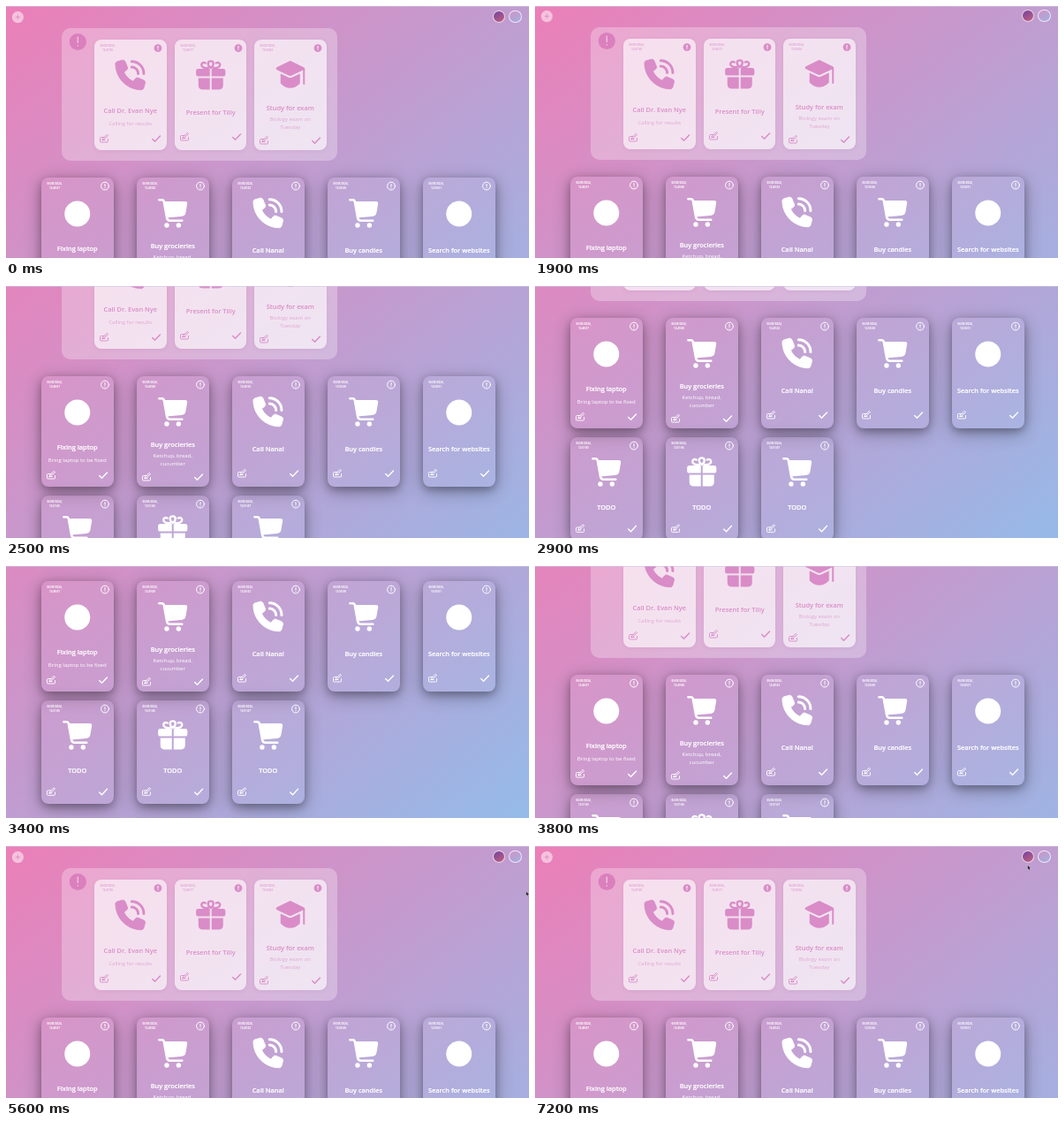
An HTML page for the animation above (7300 ms loop, 592x285 px).

```html
<!DOCTYPE html>
<html lang="en">
<head>
<meta charset="utf-8">
<title>Todo board</title>
<style>
  html, body { margin: 0; width: 100%; height: 100%; overflow: hidden; }
  #stage { position: relative; width: 592px; height: 285px; overflow: hidden; }
  #stage::after { content: ""; position: absolute; inset: 0 0 auto; height: 1px; background: rgba(205, 200, 232, .6); }
  #page { position: absolute; width: 592px; height: 463px; background: linear-gradient(to bottom right, #ec7fb8, #94bbe9); }
  #page > * { position: absolute; box-sizing: border-box; }
  .panel { left: 62.5px; top: 25px; width: 312.5px; height: 150px; border-radius: 10px; background: rgba(255, 255, 255, .28); }
  .card { width: 81.5px; border-radius: 8px; color: #fff; background: rgba(255, 255, 255, .05); box-shadow: 0 3px 8px rgba(0, 0, 0, .24), 0 5px 20px rgba(0, 0, 0, .32); }
  .urgent { color: #d98cc7; background: rgba(255, 255, 255, .63); box-shadow: 0 1px 4px rgba(160, 80, 150, .12); }
  .theme { top: 4.8px; width: 14.5px; height: 14.5px; border-radius: 50%; border: 1px solid rgba(255, 255, 255, .75); }
  svg { display: block; overflow: visible; }
  .card svg { fill: currentColor; font-family: "Open Sans", "Noto Sans", sans-serif; text-anchor: middle; }
  .line { fill: none; stroke: currentColor; stroke-linecap: round; stroke-linejoin: round; }
  .date { font-size: 3px; font-weight: 700; }
  .title { font-size: 7.4px; font-weight: 600; stroke: currentColor; stroke-width: .2px; }
  .note { font-size: 6.05px; }
  .urgent .title { stroke: none; }
  .urgent .note, .urgent .date { opacity: .7; }
  #cursor { position: absolute; left: 0; top: 0; }
</style>
</head>
<body>
<div id="stage">
  <div id="page">
    <div class="panel"></div>
    <svg width="592" height="60">
      <circle cx="13.4" cy="12.6" r="6.6" fill="#fff" fill-opacity=".52"/>
      <path d="M10.9 12.6h5M13.4 10.1v5" stroke="#dd93c6"/>
      <circle cx="81.3" cy="40.5" r="9.6" fill="#db7fbd"/>
      <path d="M81.3 35.2v6.4M81.3 44.7v.4" stroke="#f0bfde" stroke-width="1.5" stroke-linecap="round"/>
    </svg>
    <div class="theme" style="left:550.7px;background:linear-gradient(150deg,#73409f,#c4627f)"></div>
    <div class="theme" style="left:569px;background:linear-gradient(150deg,#d093c6,#a0b2e2)"></div>
  </div>
  <svg id="cursor" width="6" height="8"><path d="M0 0v5.6l1.4-1.2 1 2 .9-.4-.9-2h1.7z" fill="#2b2030" stroke="#fff" stroke-width=".35"/></svg>
</div>
<script>
const LOOP = 7300, STEP = 100;
const page = document.getElementById('page');
const cursor = document.getElementById('cursor');

// Icons are centred on 0,0 and about 33px wide.
const icons = {
  dot: '<circle cy="1" r="14.5"/>',
  phone: `<g transform="scale(.0655) translate(-256 -256)">
    <path stroke="currentColor" stroke-width="14" stroke-linejoin="round" d="M164.9 24.6c-7.7-18.6-28-28.5-47.4-23.2l-88 24C12.1 30.2 0 46 0 64c0 247.4 200.6 448 448 448 18 0 33.8-12.1 38.6-29.5l24-88c5.3-19.4-4.6-39.7-23.2-47.4l-96-40c-16.3-6.8-35.2-2.1-46.3 11.6L304.7 368C234.3 334.7 177.3 277.7 144 207.3L193.3 167c13.7-11.2 18.4-30 11.6-46.3z"/>
    <path class="line" stroke-width="46" d="M280 24a208 208 0 0 1 208 208M280 120a112 112 0 0 1 112 112"/></g>`,
  cart: `<path class="line" stroke-width="2.6" d="M-15.3-14.8h3.3q1.6 0 2 1.6l3.4 19q.6 3 3.4 3H10.5"/>
    <path d="M-11-13H14q2.8 0 2.4 2.8l-1.6 9.4Q14.2 3.6 9.8 4L-7 5.6z"/>
    <circle cx="-6.8" cy="14" r="2.7"/><circle cx="6.6" cy="14" r="2.7"/>`,
  gift: `<path d="M-1-7v8.5h-13q-2.6 0-2.6-2.6v-3.3q0-2.6 2.6-2.6zM1-7v8.5h13q2.6 0 2.6-2.6v-3.3q0-2.6-2.6-2.6zM-1 3.5v13h-8q-5 0-5-5v-8zM1 3.5v13h8q5 0 5-5v-8z"/>
    <path class="line" stroke-width="2.4" d="M-3-8C-13-7-12-16-6-13.5M3-8C13-7 12-16 6-13.5M0-8C-5-12-3-15.6 0-15.6S5-12 0-8"/>`,
  cap: `<path class="line" style="fill:currentColor" stroke-width="3.4" d="M0-14.2L14.4-7.2 0-.6-14.4-7.2z"/>
    <path d="M-11-1.5L-2 2.8Q0 3.7 2 2.8L11-1.5V9.5Q6 14.8 0 14.8T-11 9.5z"/>
    <path class="line" stroke-width="2" d="M15.5-7V10"/>`
};

// Vertical places of title, notes and buttons for 0, 1 or 2 note lines.
const layouts = [
  { title: 82, notes: [], buttons: 110 },
  { title: 80, notes: [94.5], buttons: 112 },
  { title: 77, notes: [90, 99], buttons: 114 }
];

const text = (cls, x, y, size, words) => `<text class="${cls}" x="${x}" y="${y + size * .35}">${words}</text>`;

function addCard(x, y, height, icon, title, time, notes = [], urgent = false) {
  const layout = layouts[notes.length];
  const lift = 125 - height ? 3 : 0;
  const b = layout.buttons - lift * 2.2;
  const mark = urgent ? '#fff' : 'currentColor';
  const card = document.createElement('div');
  card.className = urgent ? 'card urgent' : 'card';
  card.style.cssText = `left:${x}px;top:${y}px;height:${height}px`;
  card.innerHTML = `<svg width="81.5" height="${height}">
    ${text('date', 15, 7.3, 3, '06/05/2024,')}${text('date', 15, 11.8, 3, time)}
    <g transform="translate(72 9.6)">
      <circle r="4.4" class="${urgent ? '' : 'line'}"/>
      <path class="line" style="stroke:${mark}" stroke-width="1" d="M0-2.1V.5M0 2.1v.1"/>
    </g>
    <g transform="translate(40.75 ${40 - lift / 3})">${icons[icon]}</g>
    ${text('title', 40.75, layout.title - lift, 7.4, title)}
    ${notes.map((n, i) => text('note', 40.75, layout.notes[i], 6.05, n)).join('')}
    <path class="line" stroke-width=".9" transform="translate(11 ${b})" d="M0-1.5h-3.5q-1 0-1 1v3.5q0 1 1 1h7q1 0 1-1v-2.5M-2 1.5l.6-1.8 4.8-4.3 1.2 1.3-4.8 4.2zM-2 1.5h3"/>
    <path class="line" stroke-width="1.4" transform="translate(70 ${b})" d="M-4.3.5l2.8 2.8 6-6.4"/>
  </svg>`;
  page.append(card);
}

[
  ['phone', 'Call Dr. Evan Nye', '12:47:50', ['Calling for results']],
  ['gift', 'Present for Tilly', '12:48:17', []],
  ['cap', 'Study for exam', '12:50:04', ['Biology exam on', 'Tuesday']]
].forEach((c, i) => addCard(100 + i * 90.6, 37.7, 125, ...c, true));

[
  ['dot', 'Fixing laptop', '12:48:57', ['Bring laptop to be fixed']],
  ['cart', 'Buy grocieries', '12:49:08', ['Ketchup, bread,', 'cucumber']],
  ['phone', 'Call Nana!', '12:49:32', []],
  ['cart', 'Buy candles', '12:50:38', []],
  ['dot', 'Search for websites', '12:50:51', []]
].forEach((c, i) => addCard(40 + i * 108.1, 194, 125, ...c));

['cart', 'gift', 'cart'].forEach((icon, i) => addCard(40 + i * 108.1, 329, 117, icon, 'TODO', '12:51:0' + (i + 5)));

const scrollKeys = [
  [1800, 0], [1900, 1], [2000, 7], [2100, 19], [2300, 54], [2500, 92], [2800, 145], [3000, 171],
  [3100, 178], [3200, 178], [3400, 177], [3600, 127], [3800, 71], [4000, 23], [4100, 10],
  [4200, 4], [4300, 4], [4400, 1], [4500, 0]
];

function valueAt(keys, t) {
  const next = keys.findIndex(k => k[0] > t);
  if (next === 0) return keys[0][1];
  if (next < 0) return keys[keys.length - 1][1];
  const [t0, v0] = keys[next - 1], [t1, v1] = keys[next];
  return v0 + (v1 - v0) * (t - t0) / (t1 - t0);
}

function cursorAt(t) {
  if (t >= 5600 && t < 6100) return [588.5, 51];
  if (t < 6600) return null;
  const left = (1 - (t - 6600) / 600) ** 2;
  return [557.5 + 19 * left, 21.5 + 19 * left];
}

function draw(now) {
  const t = Math.floor(now % LOOP / STEP) * STEP;
  page.style.transform = `translateY(${-valueAt(scrollKeys, t)}px)`;
  const spot = cursorAt(t);
  cursor.style.display = spot ? 'block' : 'none';
  if (spot) cursor.style.transform = `translate(${spot[0]}px, ${spot[1]}px)`;
  requestAnimationFrame(() => draw(performance.now()));
}
draw(performance.now());
</script>
</body>
</html>
```
